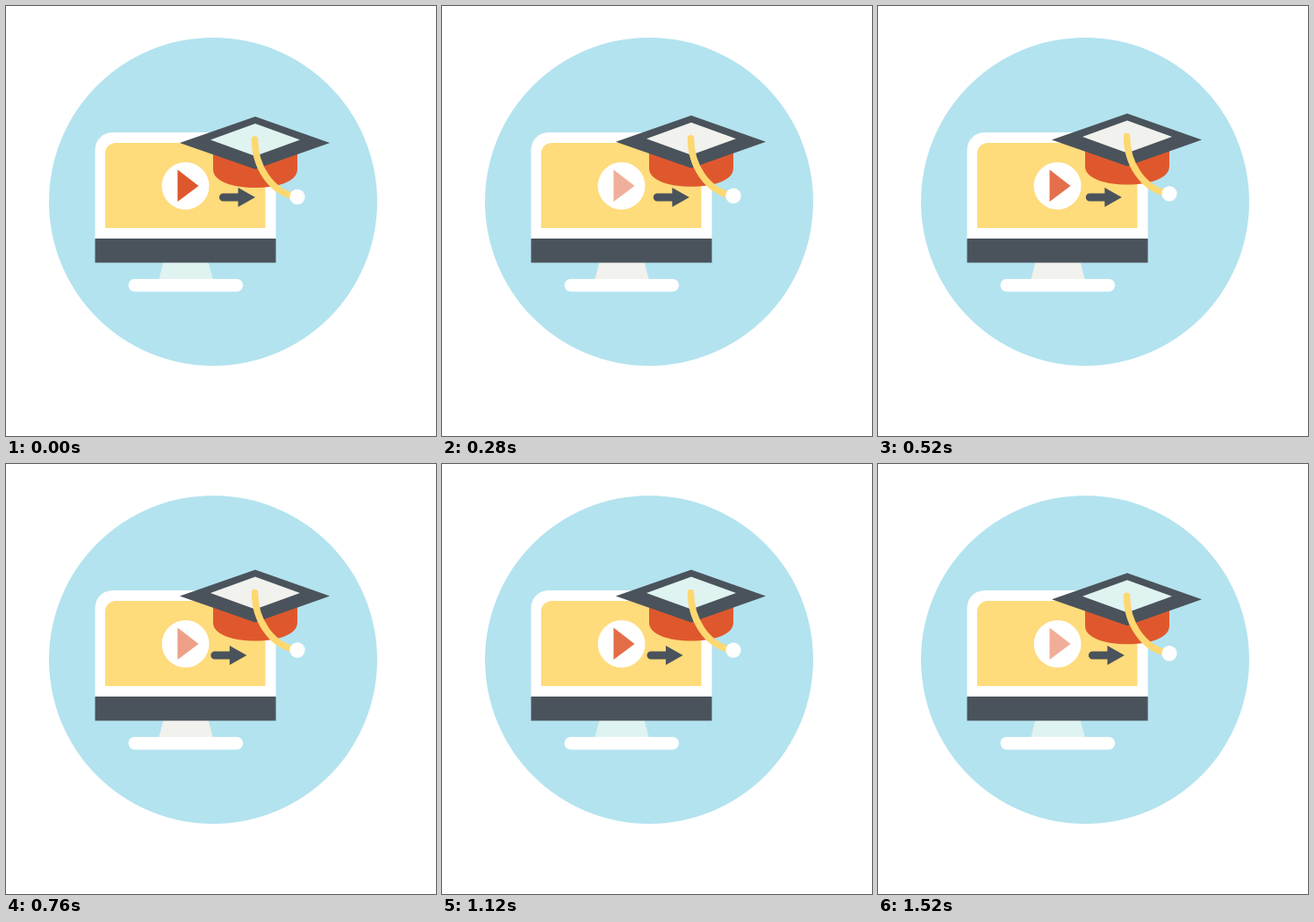
An HTML page that plays this animation: 490x490 px, repeating every 1560 ms.

```html
<!DOCTYPE html>
<html lang="en">
<head>
<meta charset="utf-8">
<title>Online learning</title>
<style>
  html, body { margin: 0; width: 100%; height: 100%; overflow: hidden; background: #fff; }
  svg { display: block; width: 100%; height: 100%; }
  .dark { fill: #4a535b; }
  .red { fill: #df582d; }
  .yellow { fill: #fedb7b; }
  .white { fill: #fff; }
</style>
</head>
<body>
<svg viewBox="0 0 490 490">
  <circle cx="236" cy="223" r="187" fill="#b3e3ef"/>

  <g id="monitor">
    <path class="pale" d="M180 290H230L236 312H174Z"/>
    <rect class="white" x="139.5" y="311" width="130.5" height="14.5" rx="7.2"/>
    <path class="white" d="M101.5 266V164a20 20 0 0 1 20-20H287.5a20 20 0 0 1 20 20V266Z"/>
    <path class="yellow" d="M113 253V168a12 12 0 0 1 12-12H283.5a12 12 0 0 1 12 12V253Z"/>
    <rect class="dark" x="101.5" y="265" width="206" height="27.5"/>
  </g>

  <circle class="white" cx="204.5" cy="205" r="27"/>
  <path id="play" class="red" d="M195.5 186.5L219.5 205L195.5 223Z"/>

  <path id="arrow" class="dark" d="M247.5 213.5H264.500V207L284 218L264.500 229V222.500H247.500a4.500 4.500 0 0 1 0-9Z"/>

  <g id="cap">
    <path class="red" d="M236 160H332V186C332 200 310 207 284 207S236 200 236 186Z"/>
    <path class="dark" d="M198 156L284 126L369 156L284 186Z"/>
    <path class="pale" d="M233 152.500L284 134L335 152.500L284 171Z"/>
    <path d="M283.500 152C283.500 182 301 212 331 217.500" fill="none" stroke="#fdd871" stroke-width="7.500" stroke-linecap="round"/>
    <circle class="white" cx="332" cy="217.500" r="8.700"/>
  </g>
</svg>
<script>
  const LOOP = 1560, STEP = 40;
  const SWAY = 1860, BLINK = 595;
  const byId = id => document.getElementById(id);
  const play = byId('play'), arrow = byId('arrow'), cap = byId('cap');
  const paleParts = document.querySelectorAll('.pale');

  // Swings 1 -> 0 -> 1 over one period.
  const wave = (t, period) => (1 + Math.cos(2 * Math.PI * t / period)) / 2;

  function draw(now) {
    const t = Math.floor(now % LOOP / STEP) * STEP;
    const sway = 1 - wave(t, SWAY);
    arrow.setAttribute('transform', `translate(${-10.5 * sway} 0)`);
    cap.setAttribute('transform', `translate(0 ${-6 * sway})`);
    play.setAttribute('opacity', 0.48 + 0.52 * wave(t, BLINK) ** 2);
    const pale = t >= 160 && t < 960 ? '#f1f1ed' : '#dff3f1';
    paleParts.forEach(part => part.setAttribute('fill', pale));
  }

  const start = performance.now();
  function tick() {
    draw(performance.now() - start);
    requestAnimationFrame(tick);
  }
  tick();
</script>
</body>
</html>
```
